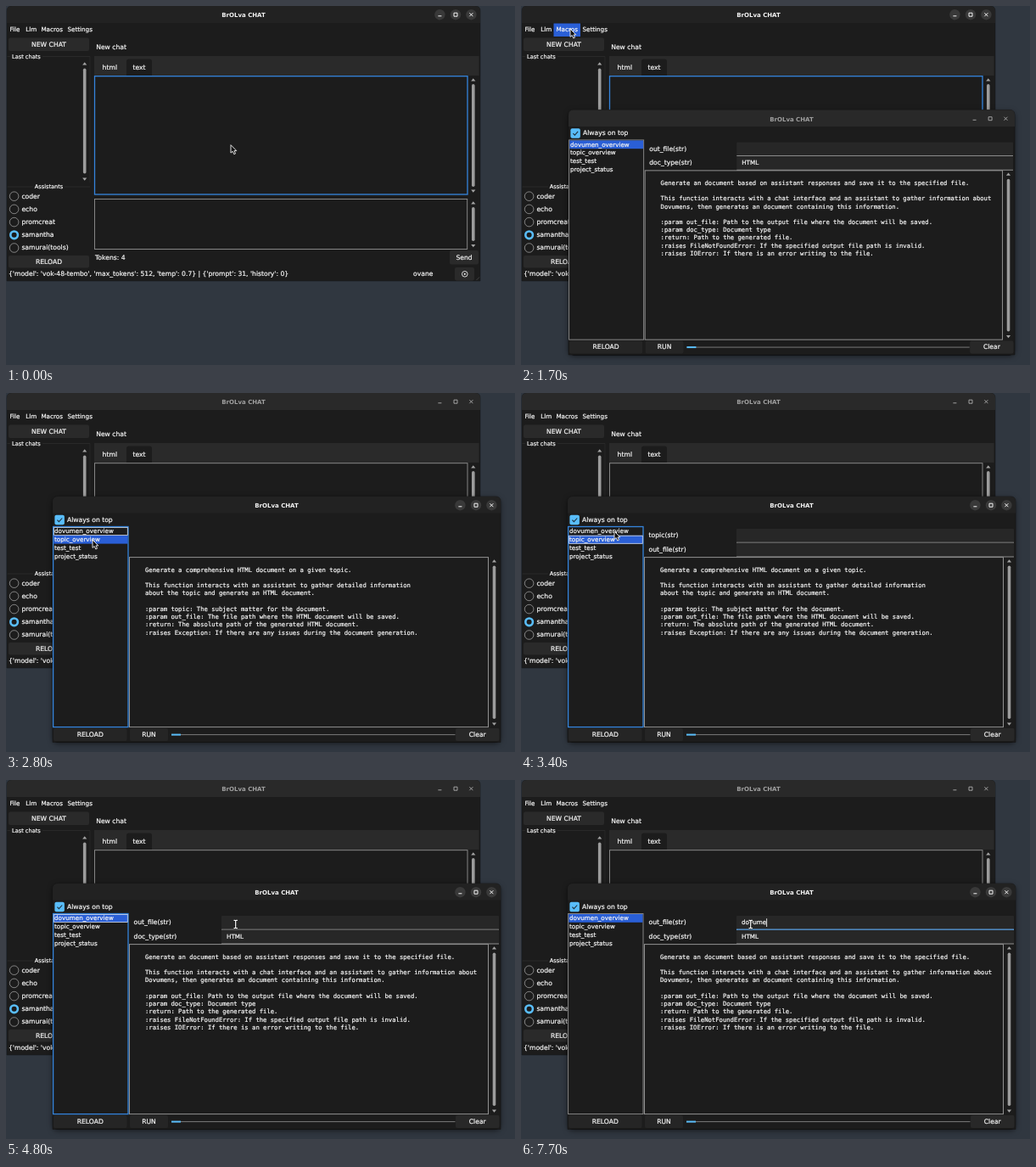
Recreate the animation shown at these times as an HTML page. Size 600x423 px, loop 8000 ms.

```html
<!DOCTYPE html>
<html lang="en">
<head>
<meta charset="utf-8">
<title>Chat macros</title>
<style>
  html, body { margin: 0; width: 100%; height: 100%; overflow: hidden; background: #303740; }
  svg { display: block; width: 600px; height: 423px; }
  text { font: 7.65px "DejaVu Sans", sans-serif; fill: #f4f4f4; stroke: #f4f4f4; stroke-width: .22px;
    text-rendering: geometricPrecision; white-space: pre; }
  .small { font-size: 7.2px; }
  .tiny { font-size: 6.6px; }
  .title { font-size: 7px; font-weight: bold; stroke: none; }
  .mono { font: 7.22px "DejaVu Sans Mono", monospace; }
  .mid { text-anchor: middle; }
</style>
</head>
<body>
<svg id="stage" viewBox="0 0 600 423" xmlns="http://www.w3.org/2000/svg"></svg>
<script>
const LOOP = 8000, STEP = 100;
const BODY = '#1c1c1c', RAISED = '#2a2a2a', GREY = '#919191', BLUE = '#3584dc', SELECT = '#2a5fd6', ACCENT = '#59bdfa';
const APP = 'BrOLva CHAT';
const stage = document.getElementById('stage');

function el(parent, tag, attrs = {}, content) {
  const node = document.createElementNS('http://www.w3.org/2000/svg', tag);
  set(node, attrs);
  if (content !== undefined) node.textContent = content;
  parent.appendChild(node);
  return node;
}
function set(node, attrs) {
  for (const k in attrs) node.setAttribute(k, attrs[k]);
}
const group = parent => el(parent, 'g');
const show = (node, on) => set(node, { visibility: on ? 'visible' : 'hidden' });
const label = (p, x, y, s, cls = '') => el(p, 'text', { x, y, class: cls }, s);
const path = (p, d, stroke, width = 1, fill = 'none') => el(p, 'path', { d, stroke, 'stroke-width': width, fill });

// Rectangle given by its left, top, right and bottom edges
function box(p, l, t, r, b, fill, rx = 0) {
  return el(p, 'rect', { x: l, y: t, width: r - l, height: b - t, fill, rx });
}
function outline(p, l, t, r, b, stroke, width = 1) {
  const rect = box(p, l, t, r, b, 'none');
  set(rect, { stroke, 'stroke-width': width });
  return rect;
}
function button(p, l, t, r, b, s, fill = RAISED) {
  box(p, l, t, r, b, fill, 2);
  label(p, (l + r) / 2, (t + b) / 2 + 2.5, s, 'mid');
}
function scrollbar(p, x, up, top, bottom, down) {
  path(p, `M${x - 2.6} ${up + 1.6}h5.2l-2.6 -3.4z`, 'none', 0, '#a4a4a4');
  path(p, `M${x - 2.6} ${down - 1.6}h5.2l-2.6 3.4z`, 'none', 0, '#a4a4a4');
  box(p, x - 1.8, top, x + 1.8, bottom, '#9c9c9c', 1.8);
}
function titleBar(p, l, t, r, h) {
  const bar = path(p, `M${l} ${t + h}V${t + 6}q0 -6 6 -6H${r - 6}q6 0 6 6V${t + h}z`, 'none', 0, '#222');
  const text = label(p, (l + r) / 2, t + 13.3, APP, 'title mid');
  const y = t + 10.2;
  const discs = [], marks = [];
  [r - 47.6, r - 29, r - 10.6].forEach((x, i) => {
    discs.push(el(p, 'circle', { cx: x, cy: y, r: 6.2, fill: '#393939' }));
    const d = [`M${x - 2} ${y + 1.6}h4`, `M${x - 2} ${y - 2}h4v4h-4z`, `M${x - 2} ${y - 2}l4 4m0 -4l-4 4`][i];
    marks.push(path(p, d, '#fff', 1));
  });
  return on => {
    set(bar, { fill: on ? '#222' : '#292929' });
    text.style.fill = on ? '#f4f4f4' : '#a0a0a0';
    discs.forEach(n => show(n, on));
    marks.forEach(n => set(n, { stroke: on ? '#f4f4f4' : '#a0a0a0' }));
  };
}

// Main window
const main = group(stage);
path(main, 'M1 324V6q0 -6 6 -6H553q6 0 6 6V324z', '#171a1d', 0.6, BODY);
const focusMain = titleBar(main, 1, 0, 559, 20);
const menuGlow = box(main, 38.5, 20.5, 70, 36, SELECT);
[[4.4, 'File'], [23.2, 'Llm'], [41.4, 'Macros'], [72.4, 'Settings']].forEach(([x, s]) => label(main, x, 30.2, s, 'small'));

button(main, 3, 37.5, 98, 53, 'NEW CHAT');
label(main, 106.2, 50.6, 'New chat');
path(main, 'M1.5 59.5H5M43 59.5H99V208M1.5 213H32M69 213H99', '#2c2c2c', 0.8);
label(main, 7, 61.5, 'Last chats', 'tiny');
label(main, 50.5, 215, 'Assistants', 'tiny mid');
scrollbar(main, 92.7, 68, 73.5, 197.5, 204);

['coder', 'echo', 'promcreat', 'samantha', 'samurai(tools)'].forEach((s, i) => {
  const cy = 224.2 + i * 15.2, on = i === 3;
  el(main, 'circle', { cx: 9.6, cy, r: on ? 4.3 : 5.3, fill: BODY, stroke: on ? ACCENT : GREY, 'stroke-width': on ? 2.6 : 0.9 });
  label(main, 18.4, cy + 2.4, s);
});
button(main, 3, 294, 98, 308.5, 'RELOAD');

box(main, 104, 59, 557.5, 82, RAISED);
path(main, 'M142 82V65.5q0 -3 3 -3H169q3 0 3 3V82z', 'none', 0, BODY);
label(main, 113.6, 74.8, 'html');
label(main, 149.4, 74.8, 'text');
const output = outline(main, 104.5, 82.7, 544, 222, BLUE, 1.3);
const mainCaret = box(main, 105.3, 83.5, 106.7, 93.5, '#a9c9ea');
scrollbar(main, 550.8, 87, 92, 213, 218);
outline(main, 104.5, 227.5, 543.7, 286.5, GREY, 0.9);
scrollbar(main, 550.8, 232, 237, 277, 282.5);
label(main, 105, 298.8, 'Tokens: 4');
button(main, 523, 288, 557, 304.5, 'Send');
label(main, 3, 317.7, "{'model': 'vok-48-tembo', 'max_tokens': 512, 'temp': 0.7} | {'prompt': 31, 'history': 0}");
label(main, 480, 317.7, 'ovane');
box(main, 529, 308, 552, 323.5, RAISED, 2);
el(main, 'circle', { cx: 540.8, cy: 315.8, r: 3.3, fill: 'none', stroke: '#eee', 'stroke-width': 0.9 });
el(main, 'circle', { cx: 540.8, cy: 315.8, r: 1.1, fill: '#eee' });
path(main, 'M554.5 323l3.5 -3.5', '#555', 0.7);

// Macro window
const popup = group(stage);
const shade = box(popup, 55, 123, 583, 412, '#000', 6);
shade.style.filter = 'drop-shadow(0 1px 3px rgba(0,0,0,.55))';
path(popup, 'M55 411.5V128q0 -6 6 -6H577q6 0 6 6V411.5z', '#151515', 0.6, BODY);
const focusPopup = titleBar(popup, 55, 122, 583, 19.5);
box(popup, 57.4, 143.8, 68.9, 155.3, ACCENT, 2);
path(popup, 'M60.4 149.7l2 2l3.8 -4.2', '#20303a', 1.1);
label(popup, 72, 152, 'Always on top');

const ROW = 9.8, ROW_TOP = 158;
const listFrame = outline(popup, 55.6, 157.5, 144, 393.6, GREY);
const rowFill = box(popup, 56.3, ROW_TOP, 143.5, ROW_TOP + ROW, SELECT);
const rowRing = outline(popup, 56.6, ROW_TOP + 0.4, 143.3, ROW_TOP + ROW - 0.3, '#d8dde4', 0.8);
['dovumen_overview', 'topic_overview', 'test_test', 'project_status'].forEach((s, i) =>
  label(popup, 57, 165.3 + i * ROW, s, 'small'));

const fields = group(popup);
const names = [], lines = [];
[160, 176.8].forEach((y, i) => {
  box(fields, 254, y, 581, y + 16, '#272727', 1);
  lines.push(path(fields, `M254 ${y + 16.2}H581`, GREY));
  names.push(label(fields, 150.6, 170.2 + i * 16.5, ''));
});
const typed = label(fields, 260, 170.3, '', 'small');
const format = label(fields, 260, 186.7, 'HTML', 'small');
const fieldCaret = box(fields, 260, 163.2, 260.9, 173, '#f2f2f2');

outline(popup, 145.5, 193.6, 568.5, 393.6, GREY);
scrollbar(popup, 575.5, 198, 203.5, 384, 390);
function doc(rows) {
  const g = group(popup);
  rows.forEach((s, i) => label(g, 164, 210.6 + i * 9.27, s, 'mono'));
  return g;
}
const firstDoc = doc([
  'Generate an document based on assistant responses and save it to the specified file.', '',
  'This function interacts with a chat interface and an assistant to gather information about',
  'Dovumens, then generates an document containing this information.', '',
  ':param out_file: Path to the output file where the document will be saved.',
  ':param doc_type: Document type',
  ':return: Path to the generated file.',
  ':raises FileNotFoundError: If the specified output file path is invalid.',
  ':raises IOError: If there is an error writing to the file.'
]);
const topicDoc = doc([
  'Generate a comprehensive HTML document on a given topic.', '',
  'This function interacts with an assistant to gather detailed information',
  'about the topic and generate an HTML document.', '',
  ':param topic: The subject matter for the document.',
  ':param out_file: The file path where the HTML document will be saved.',
  ':return: The absolute path of the generated HTML document.',
  ':raises Exception: If there are any issues during the document generation.'
]);

button(popup, 56, 395, 142.5, 410, 'RELOAD', '#252525');
button(popup, 146, 395, 191, 410, 'RUN', '#252525');
button(popup, 530, 395, 581.5, 410, 'Clear', '#282828');
path(popup, 'M195 402.6H529.5', '#858585', 0.9);
path(popup, 'M195 402.6H206', ACCENT, 2);

// Pointer shapes, each with its hot spot at 0,0
const arrow = path(stage, 'M0 0V9.4L2.2 7.5L3.8 11L5.5 10.2L4 6.9H6.8z', '#f4f4f4', 0.9, '#111');
const beam = group(stage);
const beamShape = 'M-2.2 -4.6H-0.7L0 -4L0.7 -4.6H2.2M0 -4V4M-2.2 4.6H-0.7L0 4L0.7 4.6H2.2';
path(beam, beamShape, '#111', 2.4);
path(beam, beamShape, '#fff', 1.2);

// time, x, y
const route = [
  [0, 265, 163.7], [300, 196, 116], [600, 58, 54], [700, 31, 41], [800, 44, 33], [900, 55, 29], [1000, 58, 27],
  [1800, 58, 27], [2100, 92, 120], [2400, 102, 173], [2800, 102, 173], [3400, 110, 163],
  [4200, 110, 163], [4300, 252, 166], [4400, 252, 166], [4800, 270.7, 170]
];
function pointerAt(t) {
  const i = route.findIndex(k => k[0] > t);
  if (i < 0) return route[route.length - 1].slice(1);
  const [t0, x0, y0] = route[i - 1], [t1, x1, y1] = route[i];
  const u = (t - t0) / (t1 - t0);
  return [x0 + (x1 - x0) * u, y0 + (y1 - y0) * u];
}

const WORD = 'dovume', KEYS = [6100, 6300, 7300, 7400, 7500, 7700];
const within = (t, ...spans) => spans.some(([a, b]) => t >= a && t < b);

function draw(t) {
  const [x, y] = pointerAt(t);
  const popupFocus = t >= 2800, onTopic = within(t, [2800, 3900]);
  const inField = t >= 5000, inList = popupFocus && !inField;

  focusMain(!popupFocus);
  focusPopup(popupFocus);
  set(output, { stroke: popupFocus ? GREY : BLUE, 'stroke-width': popupFocus ? 0.9 : 1.3 });
  show(menuGlow, t < 2800 && x > 38 && x < 70 && y < 36);
  show(mainCaret, within(t, [100, 700], [1000, 1700], [2000, 2600]));

  set(popup, {
    display: t < 1700 ? 'none' : 'inline',
    transform: t < 1900 ? 'translate(319 267) scale(.9962) translate(-319 -267)' : ''
  });
  set(listFrame, { stroke: inList ? BLUE : GREY, 'stroke-width': inList ? 1.3 : 0.9 });
  set(rowFill, { transform: `translate(0 ${onTopic ? ROW : 0})` });
  set(rowRing, {
    transform: `translate(0 ${within(t, [2900, 4000]) ? ROW : 0})`,
    display: inList ? 'inline' : 'none'
  });
  set(firstDoc, { display: onTopic ? 'none' : 'inline' });
  set(topicDoc, { display: onTopic ? 'inline' : 'none' });

  // The form is empty for one step while it is rebuilt
  set(fields, { display: within(t, [2800, 2900]) ? 'none' : 'inline' });
  names[0].textContent = onTopic ? 'topic(str)' : 'out_file(str)';
  names[1].textContent = onTopic ? 'out_file(str)' : 'doc_type(str)';
  format.textContent = onTopic ? '' : 'HTML';
  set(lines[0], { stroke: inField ? '#5aa2e6' : GREY, 'stroke-width': inField ? 1.5 : 1 });
  typed.textContent = WORD.slice(0, KEYS.filter(k => t >= k).length);
  const width = typed.textContent ? typed.getComputedTextLength() : 0;
  set(fieldCaret, {
    x: 260 + width,
    display: within(t, [5000, 5600], [5900, 6800], [7200, LOOP]) ? 'inline' : 'none'
  });

  const isBeam = t >= 4500;
  show(arrow, !isBeam);
  show(beam, isBeam);
  set(isBeam ? beam : arrow, { transform: `translate(${x} ${y})` });
}

const start = performance.now();
function tick() {
  const t = (performance.now() - start) % LOOP;
  draw(Math.floor(t / STEP) * STEP);
  requestAnimationFrame(tick);
}
tick();
</script>
</body>
</html>
```
